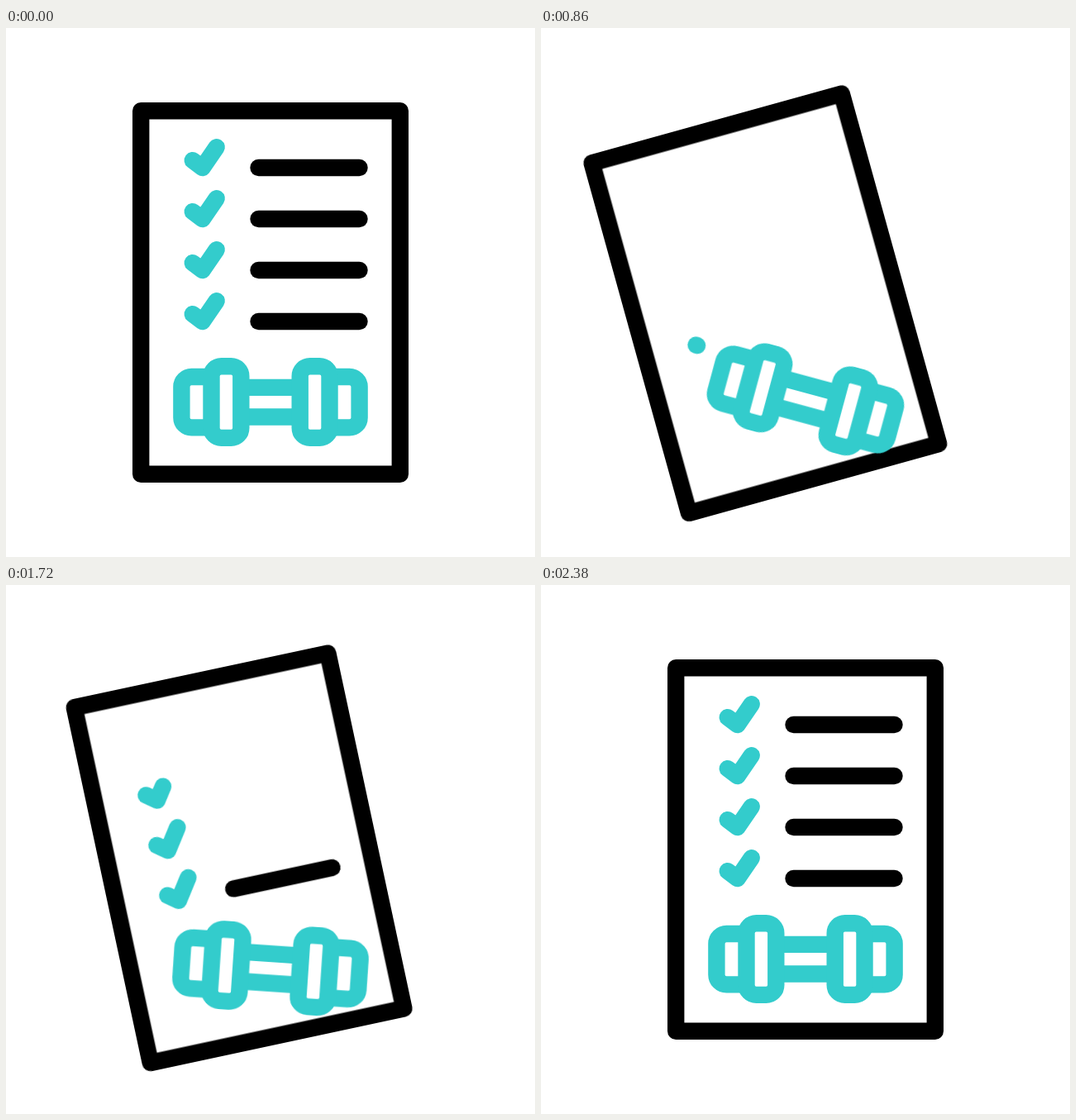
An HTML page without scripts for the animation above (2400 ms loop, 640 by 640 pixels).

```html
<!DOCTYPE html>
<html lang="en">
<head>
<meta charset="utf-8">
<title>Workout checklist</title>
<style>
  html, body { margin: 0; width: 100%; height: 100%; overflow: hidden; background: #fff; }
  svg { display: block; width: 100%; height: 100%; fill: none; stroke-width: 20.4; stroke-linejoin: round; }
  .sheet { stroke: #000; transform-origin: 320px 320px; animation: tilt 2.4s cubic-bezier(.8, 0, .2, 1) infinite; }
  .teal { stroke: #3cc; }
  .mark { stroke-linecap: round; stroke-dasharray: 1 2; animation: 2.4s cubic-bezier(.33, 0, .67, 1) infinite; }
  .hop, .rock { animation: hop 2.4s cubic-bezier(.33, 0, .67, 1) infinite; }
  .rock { transform-origin: 320px 452.6px; animation-name: rock; }

  @keyframes tilt {
    0%, 99.167%, 100% { transform: translate(0, 0) rotate(0deg); }
    50% { transform: translate(-52px, 14.1px) rotate(-16.58deg); }
  }
  @keyframes hop {
    0%, 99.167%, 100% { transform: translateY(0); }
    20% { transform: translateY(9.5px); }
    55.833% { transform: translateY(-21px); }
    73.333% { transform: translateY(12px); }
  }
  @keyframes rock {
    0%, 86.667%, 100% { transform: rotate(0deg); }
    20% { transform: rotate(-11.5deg); }
    37.5% { transform: rotate(15.8deg); }
    56.667% { transform: rotate(-6deg); }
    70% { transform: rotate(4deg); }
  }

  /* Rows wipe away from the top down and return from the bottom up. */
  @keyframes line1 { 0%, 7.5%, 86.667%, 100% { stroke-dashoffset: 0; } 11.667%, 82.5% { stroke-dashoffset: 1.02; } }
  @keyframes line2 { 0%, 12.917%, 81.25%, 100% { stroke-dashoffset: 0; } 17.083%, 77.083% { stroke-dashoffset: 1.02; } }
  @keyframes line3 { 0%, 18.333%, 75.833%, 100% { stroke-dashoffset: 0; } 22.5%, 71.667% { stroke-dashoffset: 1.02; } }
  @keyframes line4 { 0%, 23.75%, 70.417%, 100% { stroke-dashoffset: 0; } 27.917%, 66.25% { stroke-dashoffset: 1.02; } }
  @keyframes check1 { 0%, 14.792%, 78.917%, 100% { stroke-dashoffset: 0; } 18.958%, 74.75% { stroke-dashoffset: 1.02; } }
  @keyframes check2 { 0%, 20.625%, 73.083%, 100% { stroke-dashoffset: 0; } 24.792%, 68.917% { stroke-dashoffset: 1.02; } }
  @keyframes check3 { 0%, 26.458%, 67.25%, 100% { stroke-dashoffset: 0; } 30.625%, 63.083% { stroke-dashoffset: 1.02; } }
  @keyframes check4 { 0%, 32.292%, 61.417%, 100% { stroke-dashoffset: 0; } 36.458%, 57.25% { stroke-dashoffset: 1.02; } }
</style>
</head>
<body>
<svg viewBox="0 0 640 640">
  <defs>
    <g id="weight">
      <path d="M248.5 422H224.4a12 12 0 0 0-12 12v37.4a12 12 0 0 0 12 12H248.5"/>
      <rect x="248.5" y="409.3" width="35.8" height="86.6" rx="12"/>
    </g>
  </defs>
  <g class="sheet">
    <rect x="163.2" y="100.2" width="313.6" height="439.6"/>
    <path class="mark" pathLength="1" style="animation-name: line1" d="M305.5 169h122"/>
    <path class="mark" pathLength="1" style="animation-name: line2" d="M305.5 231h122"/>
    <path class="mark" pathLength="1" style="animation-name: line3" d="M305.5 293h122"/>
    <path class="mark" pathLength="1" style="animation-name: line4" d="M305.5 355h122"/>
    <g class="teal">
      <path class="mark" pathLength="1" style="animation-name: check1" d="M225.8 160.2l11.9 8.9 17-24.9"/>
      <path class="mark" pathLength="1" style="animation-name: check2" d="M225.8 222.2l11.9 8.9 17-24.9"/>
      <path class="mark" pathLength="1" style="animation-name: check3" d="M225.8 284.2l11.9 8.9 17-24.9"/>
      <path class="mark" pathLength="1" style="animation-name: check4" d="M225.8 346.2l11.9 8.9 17-24.9"/>
    </g>
  </g>
  <g class="hop">
    <g class="rock teal">
      <path d="M284.3 434.9h71.4M284.3 470.5h71.4"/>
      <use href="#weight"/>
      <use href="#weight" transform="matrix(-1 0 0 1 640 0)"/>
    </g>
  </g>
</svg>
</body>
</html>
```
